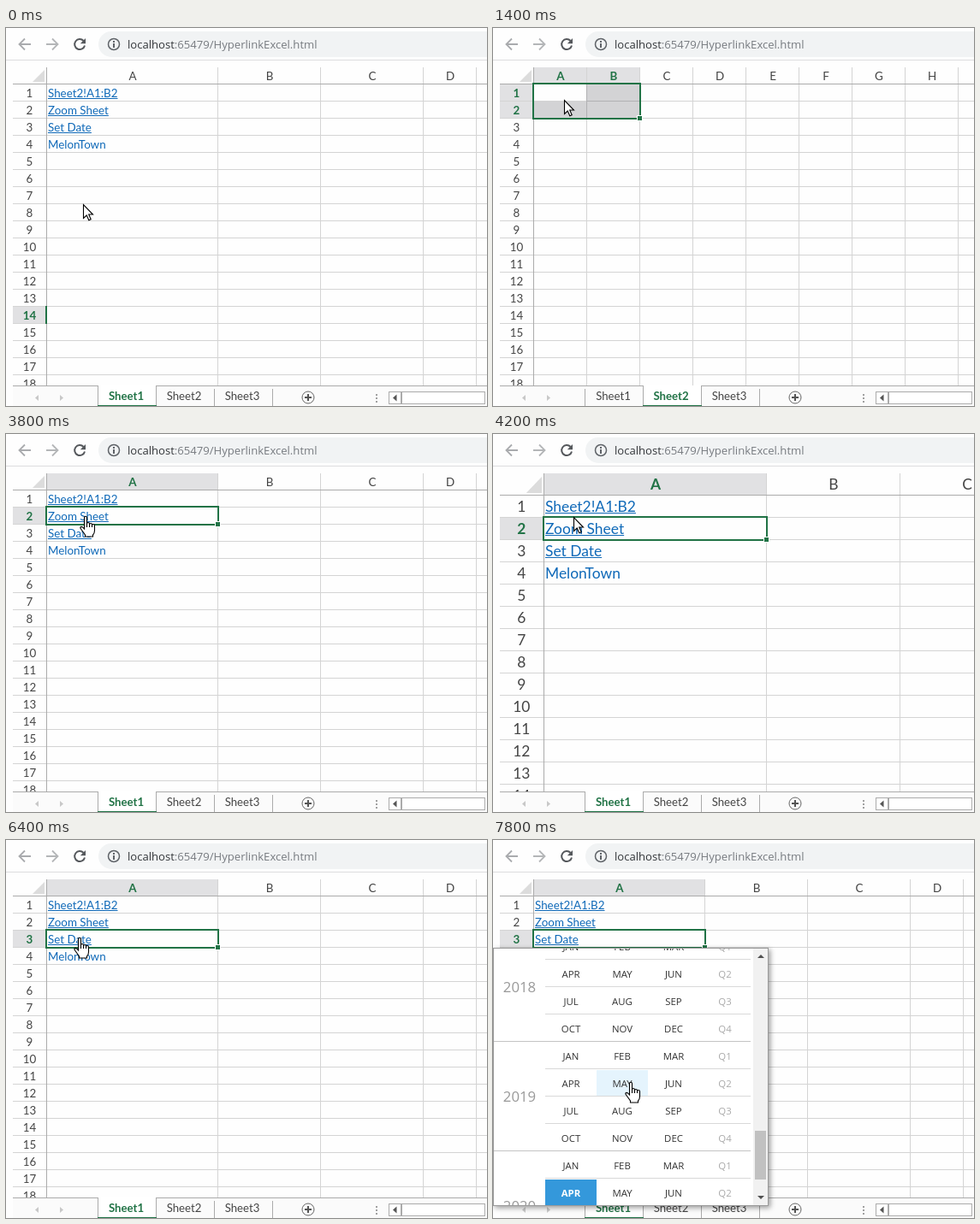
An HTML page with a canvas that plays this animation: 562x442 px, repeating every 8 s.

```html
<!DOCTYPE html>
<html lang="en">
<head>
<meta charset="utf-8">
<title>Spreadsheet hyperlinks</title>
<style>
html, body { margin: 0; width: 100%; height: 100%; overflow: hidden; background: #fff; }
canvas { display: block; }
</style>
</head>
<body>
<canvas id="stage" width="562" height="442"></canvas>
<script>
const ctx = document.getElementById('stage').getContext('2d');
const LOOP = 8000, STEP = 200;
const GREEN = '#217346', GRID = '#d4d4d4', EDGE = '#ababab', LINK = '#0f69b8', INK = '#444';
const SHEET_FONT = 'Lato, sans-serif', UI_FONT = '"Open Sans", sans-serif';
const SHEETS = [
  { widths: [200, 120, 120, 62, 62], links: ['Sheet2!A1:B2', 'Zoom Sheet', 'Set Date', 'MelonTown'] },
  { widths: Array(9).fill(62), links: [] }
];
const MONTHS = 'JAN FEB MAR Q1 APR MAY JUN Q2 JUL AUG SEP Q3 OCT NOV DEC Q4'.split(' ');

// start time, sheet, zoom, first row, selected rows, selected columns
const SCENES = [
  [0, 0, 1, 13, 1, 0],
  [1200, 0, 1, 0, 1, 1],
  [1400, 1, 1, 0, 2, 2],
  [2600, 0, 1, 0, 1, 1],
  [3800, 0, 1, 1, 1, 1],
  [4000, 0, 1.3, 1, 1, 1],
  [5000, 0, 1, 1, 1, 1],
  [6200, 0, 1, 2, 1, 1]
];
const POPUP_AT = 6800;

// time, x, y, hand
const POINTER = [
  [0, 90, 206, 0], [400, 90, 190, 0], [1000, 85, 80, 1], [1200, 83, 78, 1],
  [1400, 83, 84, 0], [1800, 88, 112, 0], [2400, 142, 428, 0], [2600, 142, 430, 0],
  [3000, 136, 380, 0], [3600, 92, 96, 1], [4000, 94, 96, 0], [4400, 94, 98, 0],
  [4600, 97, 106, 1], [5000, 100, 100, 1], [5200, 116, 112, 0], [5600, 120, 122, 0],
  [6000, 90, 115, 1], [6400, 86, 114, 1], [6800, 86, 114, 1], [7200, 200, 296, 1],
  [7600, 172, 288, 1], [7800, 161, 283, 1]
];
const ARROW = new Path2D('M.5 .5V16.5L4.2 13L6.8 18.8L9.2 17.8L6.7 12H11.5Z');
const HAND = new Path2D('M-1.5 15V1.8a1.5 1.5 0 0 1 3 0V9a1.5 1.5 0 0 1 3 0v1a1.5 1.5 0 0 1 3 0v1' +
  'a1.5 1.5 0 0 1 3 0V17q0 3-2 5v2H-.5V22L-5.5 15q-1.5-2 .5-2.6q1.5 0 3.5 2.6ZM1.5 9v4M4.5 10v3M7.5 11v2');

function box(x, y, w, h, color) {
  ctx.fillStyle = color;
  ctx.fillRect(x, y, w, h);
}

function frame(x, y, w, h, color, width = 1) {
  ctx.strokeStyle = color;
  ctx.lineWidth = width;
  ctx.strokeRect(x, y, w, h);
}

function text(str, x, y, size, color, { align = 'center', weight = 400, family = SHEET_FONT } = {}) {
  ctx.font = `${weight} ${size}px ${family}`;
  ctx.textAlign = align;
  ctx.fillStyle = color;
  ctx.fillText(str, x, y);
  return ctx.measureText(str).width;
}

function shape(d, { fill, stroke, width = 1 }) {
  const path = new Path2D(d);
  if (fill) { ctx.fillStyle = fill; ctx.fill(path); }
  if (stroke) { ctx.strokeStyle = stroke; ctx.lineWidth = width; ctx.stroke(path); }
}

function clipped(x, y, w, h, draw) {
  ctx.save();
  ctx.beginPath();
  ctx.rect(x, y, w, h);
  ctx.clip();
  draw();
  ctx.restore();
}

function drawToolbar() {
  shape('M29 19H16M22 12.5L15.5 19L22 25.5', { stroke: '#a9abae', width: 1.8 });
  shape('M47 19H60M54 12.5L60.5 19L54 25.5', { stroke: '#b4b6b8', width: 1.8 });
  shape('M90.6 15A6 6 0 1 0 92 20.5', { stroke: '#55585c', width: 2 });
  shape('M93 12V18.2H86.8Z', { fill: '#55585c' });
  shape('M562 4H123a15 15 0 0 0 0 30H562Z', { fill: '#f1f3f4' });
  shape('M132.5 19a6.5 6.5 0 1 1-13 0a6.5 6.5 0 1 1 13 0', { stroke: '#5f6368', width: 1.5 });
  box(125, 18, 2, 5, '#5f6368');
  box(125, 15, 2, 2, '#5f6368');
  const style = { align: 'left', family: UI_FONT };
  const hostWidth = text('localhost', 142, 24, 13.1, '#33363a', style);
  text(':65479/HyperlinkExcel.html', 142 + hostWidth, 24, 13.1, '#777b80', style);
  box(0, 37, 562, 1, '#dcdddf');
}

function drawGrid([, sheet, zoom, row, rows, cols]) {
  const { widths, links } = SHEETS[sheet];
  const left = 8 + 40 * zoom, top = 46 + 20 * zoom, rowH = 20 * zoom, size = 13.4 * zoom;
  const bottom = y => y + rowH / 2 + 4.8 * zoom;
  const selW = widths.slice(0, cols).reduce((a, b) => a + b, 0) * zoom;
  const selY = top + row * rowH, selH = rows * rowH;

  shape(`M${left - 3} ${top - 17 * zoom}V${top - 3}H${left - 3 - 14 * zoom}Z`, { fill: '#dcdcdc' });
  box(left, 46, selW, top - 47, '#e1e1e3');
  box(8, selY, left - 9, selH, '#e1e1e3');

  let x = left;
  widths.forEach((w, i) => {
    const on = i < cols, right = x + w * zoom;
    text(String.fromCharCode(65 + i), (x + right) / 2, bottom(46), size, on ? GREEN : INK, { weight: on ? 700 : 400 });
    box(right - 1, 46, 1, 372, GRID);
    x = right;
  });
  for (let i = 0, y = top; y < 418; i++, y += rowH) {
    const on = i >= row && i < row + rows;
    text(i + 1, 8 + 19.5 * zoom, bottom(y), size, on ? GREEN : INK, { weight: on ? 700 : 400 });
    box(8, y + rowH - 1, 554, 1, GRID);
  }
  box(8, top - 1, 554, 1, EDGE);
  box(left - 1, 46, 1, 372, EDGE);
  box(left - 2, selY - 1, 2, selH + 1, GREEN);

  links.forEach((label, i) => {
    const base = bottom(top + i * rowH);
    const w = text(label, left + 1, base, size, LINK, { align: 'left' });
    if (i < 3) box(left + 1, Math.round(base + 1), w, 1, LINK);
  });

  if (!cols) return;
  if (rows > 1) {
    const fill = 'rgba(30,30,40,.19)', firstW = widths[0] * zoom;
    box(left + firstW - 1, selY, selW - firstW + 1, rowH, fill);
    box(left, selY + rowH, selW, selH - rowH, fill);
  }
  frame(left - 1, selY - 1, selW + 1, selH + 1, GREEN, 2);
  box(left + selW - 4, selY + selH - 4, 7, 7, '#fff');
  box(left + selW - 3, selY + selH - 3, 5, 5, GREEN);
}

function drawTabs(active) {
  box(8, 418, 554, 24, '#fbfbfb');
  box(8, 418, 554, 1, EDGE);
  shape('M38 429V436L34 432.5Z', { fill: '#c8c8c8' });
  shape('M63 429V436L67 432.5Z', { fill: '#c8c8c8' });
  const edges = [107, 175, 243, 311];
  edges.forEach(x => box(x, 422, 1, 20, EDGE));
  for (let i = 0; i < 3; i++) {
    const x = edges[i], on = i === active;
    if (on) {
      box(x, 418, 69, 24, '#fff');
      box(x, 418, 1, 24, EDGE);
      box(x + 68, 418, 1, 24, EDGE);
      box(x, 441, 69, 1, GREEN);
    }
    text('Sheet' + (i + 1), x + (i ? 33 : 33.5), 435, 13.2, on ? GREEN : INK, { weight: on ? 700 : 400 });
  }
  shape('M360 432a7 7 0 1 1-14 0a7 7 0 1 1 14 0', { stroke: '#666' });
  shape('M349 432H357M353 428V436', { stroke: '#555', width: 2 });
  for (const y of [428, 432, 436]) box(432, y, 2, 2, '#a0a0a0');
  box(447, 425, 115, 15, '#fff');
  frame(447.5, 425.5, 14, 14, EDGE);
  frame(462.5, 425.5, 97, 14, EDGE);
  shape('M456.5 428.5V436.5L452 432.5Z', { fill: '#555' });
}

function drawPopup(pointer) {
  ctx.save();
  ctx.shadowColor = 'rgba(0,0,0,.4)';
  ctx.shadowBlur = 6;
  ctx.shadowOffsetX = ctx.shadowOffsetY = 2;
  box(0, 126, 322, 302, '#fff');
  ctx.restore();
  clipped(1, 127, 320, 300, () => {
    for (let r = 0; r < 10; r++) {
      const y = 108 + 32 * r;
      const yearEnd = r % 4 === 3;
      box(yearEnd ? 1 : 61, y + 31, yearEnd ? 300 : 240, 1, yearEnd ? '#c4c4c4' : '#d9d9d9');
      for (let c = 0; c < 4; c++) {
        const x = 61 + 60 * c, chosen = r === 9 && c === 0;
        const over = c < 3 && pointer.x >= x && pointer.x < x + 60 && pointer.y >= y && pointer.y < y + 32;
        if (chosen) box(x, y + 1, 60, 30, '#3498db');
        else if (over) box(x, y + 1, 60, 30, '#e5f4fd');
        text(MONTHS[r % 4 * 4 + c], x + 30, y + 20.5, 11.4, chosen ? '#fff' : c === 3 ? '#aaa' : '#333',
          { weight: chosen ? 700 : 400, family: UI_FONT });
      }
    }
    for (let i = 0; i < 3; i++) text(2018 + i, 31, 178 + 128 * i, 16.8, '#999', { family: UI_FONT });
    box(304, 127, 17, 300, '#f1f1f1');
    box(306, 340, 13, 57, '#c1c1c1');
    shape('M309 138H317L313 134Z', { fill: '#505050' });
    shape('M309 416H317L313 420Z', { fill: '#505050' });
  });
  frame(.5, 126.5, 321, 301, '#9a9a9a');
}

function pointerAt(t) {
  const i = POINTER.findLastIndex(p => p[0] <= t);
  const a = POINTER[i], b = POINTER[i + 1] || a;
  const k = b === a ? 0 : (t - a[0]) / (b[0] - a[0]);
  return { x: Math.round(a[1] + (b[1] - a[1]) * k), y: Math.round(a[2] + (b[2] - a[2]) * k), hand: a[3] };
}

function drawPointer({ x, y, hand }) {
  const path = hand ? HAND : ARROW;
  ctx.save();
  ctx.translate(x, y);
  ctx.fillStyle = '#fff';
  ctx.strokeStyle = '#000';
  ctx.lineWidth = 1.1;
  ctx.fill(path);
  ctx.stroke(path);
  ctx.restore();
}

function draw(t) {
  const scene = SCENES.findLast(s => s[0] <= t);
  const pointer = pointerAt(t);
  box(0, 0, 562, 442, '#fefefe');
  drawToolbar();
  clipped(8, 46, 554, 372, () => drawGrid(scene));
  drawTabs(scene[1]);
  if (t >= POPUP_AT) drawPopup(pointer);
  drawPointer(pointer);
}

const start = performance.now();
function tick() {
  const t = (performance.now() - start) % LOOP;
  draw(Math.floor(t / STEP) * STEP);
  requestAnimationFrame(tick);
}
tick();
</script>
</body>
</html>
```
